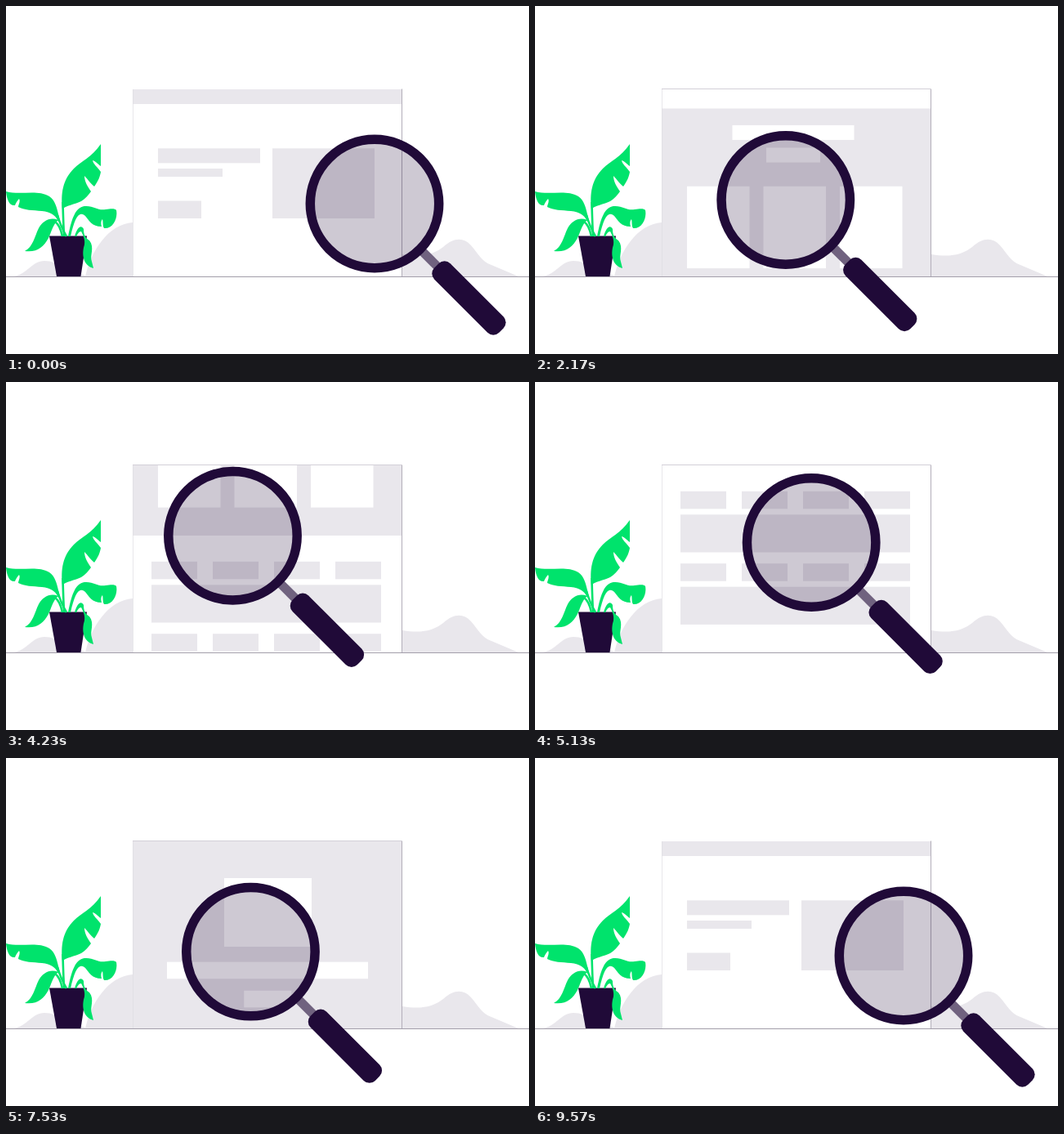
An HTML page that plays this animation: 640 by 426 pixels, repeating every 9610 ms.

```html
<!DOCTYPE html>
<html lang="en">
<head>
<meta charset="utf-8">
<title>Page search</title>
<style>
  html, body { margin: 0; width: 100%; height: 100%; overflow: hidden; background: #fff; }
  svg { display: block; width: 100%; height: 100%; }
  .dark { fill: #200a38; }
  .pale { fill: #e9e7ec; }
  .white { fill: #fff; }
  .leaf { fill: #00e36c; }
  .stem { fill: none; stroke: #00e36c; stroke-width: 2.6; }
</style>
</head>
<body>
<svg viewBox="0 0 640 426">
  <clipPath id="window"><rect x="155" y="101.5" width="329.5" height="230"/></clipPath>

  <g class="pale">
    <path d="M10 331C26 328 32 312 47 312C57 312 61 315 66 320L100 331Z"/>
    <path d="M97 331C104 300 125 267 155 265V331Z"/>
    <path d="M485 304C510 308 523 304 535 295C548 283 560 283 569 293C578 303 582 313 594 317L627 331H485Z"/>
  </g>

  <path class="dark" d="M53 281.5H99L91.500 331H62Z"/>
  <g class="stem">
    <path d="M69.500 240Q70 262 71 282"/>
    <path d="M63 256Q67 270 74 282"/>
    <path d="M60 264Q66 268 69 282"/>
  </g>
  <g class="leaf">
    <path d="M116 169C105 185 92 190 83 199C69 213 67 230 69 249C72 244 85 243 92 239C97 236 101 231 104 227C100 221 96 215 96 208C100 212 104 218 108 221C113 214 115 209 116 203C112 197 107 194 106 189C110 190 113 194 116 196Z"/>
    <path d="M0 227C18 232 38 224 53 233C62 239 63 252 66 263L64 264C60 254 52 252 44 251C33 250 22 250 15 246C15 243 18 239 16 236C14 238 12 241 11 244C4 245 1 237 0 227Z"/>
    <path d="M23 300C33 295 35 282 40 272C45 263 54 258 64 262C57 268 56 276 52 284C46 295 38 302 23 300Z"/>
    <path d="M76 282C80 262 84 247 96 245C108 244 112 251 122 249C129 248 134 248 135 250C137 260 131 273 120 272C118 269 119 264 118 261C116 263 116 267 117 270C105 270 102 263 97 257C89 250 84 260 79 282Z"/>
    <path d="M84 282C87 271 92 267 95 273C95 280 97 284 102 287C109 296 102 305 105 313L107 321C95 318 92 305 96 292C97 285 94 280 92 276C89 276 88 279 86 282Z"/>
  </g>

  <g clip-path="url(#window)"><g id="page"></g></g>
  <path d="M155.500 102V331" stroke="#dfdde3" stroke-width=".7"/>
  <path d="M484.500 101.500V331" stroke="#b3aeb9"/>
  <path id="topEdge" d="M155 101.500H484.500" stroke="#d3d0d8"/>
  <path d="M0 331.500H640" stroke="#a39eaa"/>

  <g id="lens">
    <circle r="74" class="dark" opacity=".22"/>
    <g transform="rotate(45)">
      <rect x="82" y="-5.5" width="30" height="11" fill="#70627f"/>
      <rect x="107.300" y="-13.750" width="112" height="27.500" rx="10" class="dark"/>
    </g>
    <circle r="78.700" fill="none" stroke="#200a38" stroke-width="11.500"/>
  </g>
</svg>
<script>
const LOOP = 9610, TOP = 102, SECTION = 230;
const page = document.getElementById('page');
const lens = document.getElementById('lens');
const topEdge = document.getElementById('topEdge');

function block(section, style, x, y, width, height) {
  const rect = document.createElementNS('http://www.w3.org/2000/svg', 'rect');
  const attributes = { class: style, x, y: TOP + section * SECTION + y, width, height };
  for (const name in attributes) rect.setAttribute(name, attributes[name]);
  page.append(rect);
}

['white', 'pale', 'white', 'pale'].forEach((style, i) => block(i, style, 155, 0, 330, SECTION + 1));

// Hero
block(0, 'pale', 155, 0, 330, 18);
block(0, 'pale', 186, 72.3, 125, 18);
block(0, 'pale', 186, 97, 79, 10);
block(0, 'pale', 186, 136.5, 53, 21.5);
block(0, 'pale', 326, 72.3, 125, 85.7);

// Cards
block(1, 'white', 241.5, 20.5, 149, 18);
block(1, 'white', 283, 48, 66, 18);
for (const x of [186, 279.5, 373]) block(1, 'white', x, 95.3, 76.5, 100.3);

// Table
for (const y of [31.8, 120.2]) {
  for (let i = 0; i < 4; i++) block(2, 'pale', 178 + i * 75, y, 56, 21.5);
  block(2, 'pale', 178, y + 28.5, 281, 46.2);
}

// Closing section
block(3, 'white', 267, 45, 107, 84);
block(3, 'white', 197, 147.7, 246, 20.5);
block(3, 'white', 291.3, 182.8, 58, 20.5);

// Each leg: end time, curve control point, end point, section shown at the end
const start = { time: 0, to: [451, 242], section: 0 };
const legs = [
  [1000, [413, 235], [375.6, 230.5], 0],
  [2460, [337, 234.4], [299, 238.3], 1],
  [3500, [267, 228], [246, 210.8], 1],
  [4750, [258, 181], [312, 189], 2],
  [6000, [371, 203], [429, 242], 2],
  [7250, [373, 242], [318, 242], 3],
  [8270, [270, 229], [201, 216], 3],
  [9570, [276, 208.5], [451, 242], 0]
].map(([time, control, to, section]) => ({ time, control, to, section }));

const ease = u => u * u * (3 - 2 * u);
const curve = (a, b, c, s) => (1 - s) * (1 - s) * a + 2 * s * (1 - s) * b + s * s * c;

function draw(now) {
  const time = now % LOOP;
  const found = legs.findIndex(leg => time < leg.time);
  const index = found < 0 ? legs.length - 1 : found;
  const leg = legs[index], from = legs[index - 1] || start;
  const s = ease(Math.min(1, (time - from.time) / (leg.time - from.time)));
  const [x, y] = [0, 1].map(k => curve(from.to[k], leg.control[k], leg.to[k], s));
  const scroll = SECTION * (from.section + (leg.section - from.section) * s);

  lens.setAttribute('transform', `translate(${x} ${y})`);
  page.setAttribute('transform', `translate(0 ${-scroll})`);
  topEdge.setAttribute('opacity', scroll > 0 ? 1 : 0);
}

function tick() {
  draw(performance.now());
  requestAnimationFrame(tick);
}
tick();
</script>
</body>
</html>
```
